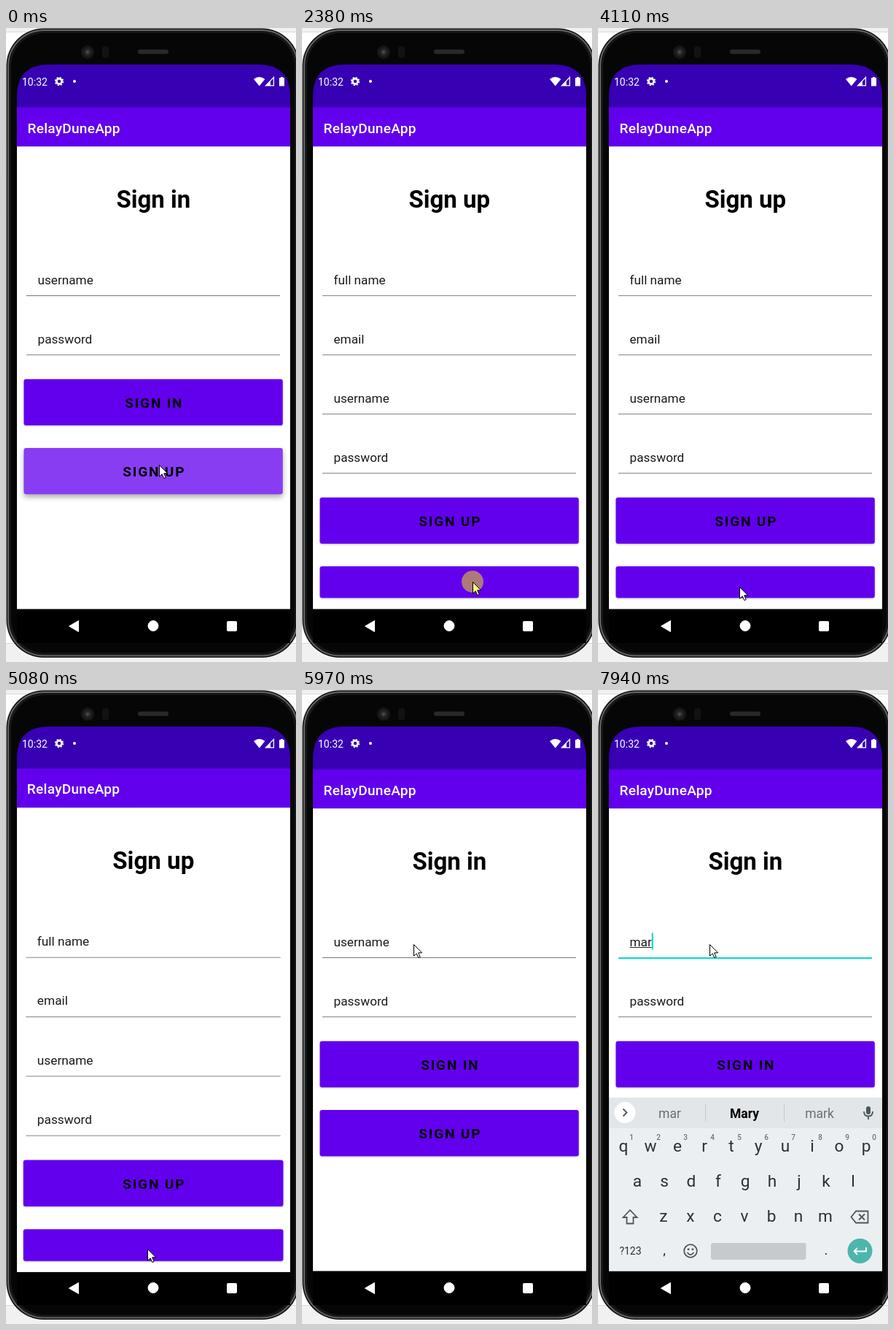
An HTML page for the animation above (8000 ms loop, 398 by 868 pixels).

```html
<!DOCTYPE html>
<html lang="en">
<head>
<meta charset="utf-8">
<title>Sign in and sign up</title>
<style>
  html, body { margin: 0; width: 100%; height: 100%; overflow: hidden; background: #fff; }
  svg { display: block; }
  text { font-family: Roboto, sans-serif; }
  .title { font-size: 19.1px; font-weight: 500; letter-spacing: .24px; fill: #fff; }
  .heading { font-size: 33px; font-weight: 700; text-anchor: middle; }
  .field { font-size: 17.2px; fill: #1a1a1a; }
  .label { font-size: 19.1px; font-weight: 700; letter-spacing: 1.8px; text-anchor: middle; }
  .button { filter: drop-shadow(0 1.5px 1px rgba(0,0,0,.28)); }
  .button.raised { filter: drop-shadow(0 4px 3.5px rgba(0,0,0,.32)); }
  #keyboard text { text-anchor: middle; fill: #263238; }
  #keyboard .key { font-size: 22.7px; }
  #keyboard .digit { font-size: 10px; font-weight: 500; fill: #6b7579; }
  #keyboard .word { font-size: 17.5px; fill: #657076; }
  .icon { fill: none; stroke: #4c575c; stroke-width: 1.8; }
</style>
</head>
<body>
<svg width="100%" height="100%" viewBox="0 0 398 868">
  <defs><clipPath id="screen"><path d="M15 842V94Q15 50 59 50H346Q390 50 390 94V842Z"/></clipPath></defs>

  <rect width="398" height="868" fill="#fff"/>
  <path d="M0 0H398V5H0ZM0 843H398V868H0Z" fill="#f1f1f1"/>
  <path d="M0 5.5H398M0 842.5H398" stroke="#dadada"/>

  <g id="phone">
    <rect x=".5" y=".5" width="402" height="861.5" rx="51" fill="#101010"/>
    <rect x="3" y="3" width="397" height="856.5" rx="49" fill="#171717" stroke="#626464" stroke-width="2"/>
    <rect x="7" y="7" width="389" height="848.5" rx="46" fill="#060606"/>
    <circle cx="112" cy="33" r="9" fill="#181818"/>
    <circle cx="112" cy="33" r="5" fill="#292929"/>
    <circle cx="112" cy="33" r="2" fill="#4a4a4a"/>
    <rect x="132" y="25" width="9" height="16" rx="3" fill="#121212"/>
    <rect x="181" y="29.5" width="42" height="6" rx="3" fill="#292929"/>
  </g>

  <g clip-path="url(#screen)">
    <rect x="15" y="50" width="375" height="792"/>
    <g id="pages"><g id="signUp"></g><g id="signIn"></g></g>
    <g id="keyboard"></g>
  </g>

  <g id="statusIcons" fill="#fff">
    <text x="22" y="78.5" font-size="14">10:32</text>
    <g fill="none" stroke="#fff">
      <circle cx="73" cy="73" r="3.6" stroke-width="2.6"/>
      <circle cx="73" cy="73" r="5.3" stroke-width="1.7" stroke-dasharray="2.2 1.96"/>
    </g>
    <circle cx="94" cy="73" r="2"/>
    <path d="M347.7 79.5L340 70Q347.7 64 355.4 70Z"/>
    <path d="M367.4 67.5V78.9H356.5Z" fill="none" stroke="#fff" stroke-width="1.3"/>
    <path d="M363 72.5V79H357Z"/>
    <path d="M377 67H380V68.3H382V79.5H375V68.3H377Z"/>
  </g>
  <g id="navIcons" fill="#fff" stroke="#fff" stroke-linejoin="round">
    <path d="M86.5 819L99.5 811.5V826.5Z"/>
    <circle cx="202" cy="818.5" r="7"/>
    <rect x="303.5" y="812.5" width="13" height="13" rx="1"/>
  </g>

  <g id="pointer">
    <circle id="halo" r="15" fill="#ff0" fill-opacity=".48"/>
    <path id="arrow" d="M.5 .5V16.2L4.2 12.8L6.8 18.6L9.2 17.5L6.7 11.8H11.6Z" stroke="#000"/>
  </g>
</svg>

<script>
const LOOP = 8000;
const PURPLE = '#6200ee', TEAL = '#03dac5';
const CENTER = [202.5, 446];
const $ = id => document.getElementById(id);
const clamp = v => Math.min(1, Math.max(0, v));
const show = (el, on) => el.setAttribute('display', on ? 'inline' : 'none');

const BURSTS = [
  [200, 200, 1], [810, 1150, 6], [1410, 2110, 11], [2380, 3050, 11],
  [3780, 4110, 6], [4370, 4800, 7], [5010, 5430, 7], [5620, 5970, 6],
  [6370, 6640, 4], [7170, 7370, 4], [7870, 7940, 2]
];
// Pointer path: time, x, y.
const PATH = [
  [0, 210, 598], [1340, 210, 598], [1650, 193, 690], [1900, 222, 768],
  [2110, 234, 758], [2740, 234, 758], [2950, 237, 526], [3050, 238, 541],
  [3710, 238, 541], [4000, 187, 740], [4110, 194, 765], [5550, 194, 765],
  [5780, 126, 560], [5970, 153, 348]
];
const CLICKS = [2380, 4370, 6370];

function button(id, y, height, label = '') {
  return `<g class="button" id="${id}">
    <rect x="24.5" y="${y}" width="355.3" height="${height}" rx="3" fill="${PURPLE}"/>
    <svg x="24.5" y="${y}" width="355.3" height="${height}"><circle class="ripple" r="0" fill="#fff"/></svg>
    <text class="label" x="203.3" y="${y + 39.2}">${label}</text></g>`;
}

function page(heading, fields, buttons) {
  const rows = fields.map((name, i) => `
    <text class="field" x="43.5" y="${350.5 + 81 * i}">${name}</text>
    <rect class="line" x="28" y="${366 + 81 * i}" width="348" height="1" fill="#858585"/>`);
  return `<rect x="15" y="50" width="375" height="792"/>
    <rect x="15" y="50" width="375" height="59" fill="#3700b3"/>
    <rect x="15" y="108.7" width="375" height="54" fill="${PURPLE}"/>
    <rect x="15" y="162.2" width="375" height="633.3" fill="#fff"/>
    <text class="title" x="29.5" y="143.5">RelayDuneApp</text>
    <text class="heading" x="202.3" y="245.5">${heading}</text>
    ${rows.join('')}${buttons}`;
}

function keyRow(letters, x, y, digits = '') {
  return [...letters].map((c, i) => `<text class="key" x="${x + 37 * i}" y="${y}">${c}</text>` +
    (digits ? `<text class="digit" x="${x + 11 + 37 * i}" y="616">${digits[i]}</text>` : '')).join('');
}

$('signIn').innerHTML = page('Sign in', ['username', 'password'],
  button('enter', 480.8, 63.3, 'SIGN IN') + button('join', 575, 63.3, 'SIGN UP')) + `
  <rect id="underline" x="43.5" y="352" height="1" fill="#222"/>
  <rect id="caret" y="332.5" width="2" height="23" fill="${TEAL}"/>`;
$('signUp').innerHTML = page('Sign up', ['full name', 'email', 'username', 'password'],
  button('create', 642.7, 63.3, 'SIGN UP') + button('back', 737, 43.3));

$('keyboard').innerHTML = `
  <rect x="15" y="558" width="375" height="237.5" fill="#eceff1"/>
  <rect x="15" y="558" width="375" height="42" fill="#e2e6e9"/>
  <circle cx="37" cy="578.5" r="14.5" fill="#fff"/>
  <path id="chevron" class="icon" d="M34.5 573.5L39.5 578.5L34.5 583.5"/>
  <g id="suggestions">
    <path d="M147.5 567V591M255.5 567V591" stroke="#c3c9cc"/>
    <text class="word" id="guess" x="98.5" y="586"></text>
    <text class="word" x="201" y="586" style="font-weight:700;fill:#000">Mary</text>
    <text class="word" x="304" y="586">mark</text>
  </g>
  <rect x="368" y="570" width="6" height="11" rx="3" fill="#4c575c"/>
  <path class="icon" d="M365 577Q365 583.5 371 583.5T377 577M371 583.5V588"/>
  ${keyRow('qwertyuiop', 35, 632, '1234567890')}
  ${keyRow('asdfghjkl', 54, 680)}
  ${keyRow('zxcvbnm', 90, 728)}
  <path class="icon" d="M44 712L34.5 722H39.5V730.5H48.5V722H53.5Z"/>
  <path class="icon" d="M347.5 721.5L354 713.5H370.5V729.5H354ZM358 717.5L366 725.5M366 717.5L358 725.5"/>
  <text x="44.5" y="773" font-size="14">?123</text>
  <text x="91" y="773" font-size="19">,</text>
  <circle class="icon" cx="127" cy="768" r="8.8"/>
  <path class="icon" d="M122.5 770Q127 776.5 131.5 770"/>
  <path d="M122.8 764.5h2.6v2.6h-2.6zM128.6 764.5h2.6v2.6h-2.6z" fill="#4c575c"/>
  <rect x="155" y="757" width="130.5" height="23" rx="3" fill="#c7cacc"/>
  <text x="313" y="773" font-size="19">.</text>
  <circle cx="359.5" cy="768" r="17" fill="#4db6ac"/>
  <path class="icon" style="stroke:#fff" d="M368 763V768.5H352M356 764L351.5 768.5L356 773"/>`;

const userText = $('signIn').querySelector('.field');
const userLine = $('signIn').querySelector('.line');

function hold(t) {
  const burst = BURSTS.findLast(b => b[0] <= t);
  if (!burst) return 0;
  const [start, end, count] = burst;
  if (t >= end) return end;
  const step = (end - start) / (count - 1);
  return start + Math.floor((t - start) / step + 1e-6) * step;
}

// Fast-out, extra-slow-in curve made of two cubic Béziers.
function ease(x) {
  const bezier = ([a, b, c, d], u) =>
    a * (1 - u) ** 3 + 3 * b * u * (1 - u) ** 2 + 3 * c * u * u * (1 - u) + d * u ** 3;
  const [xs, ys] = x < 1 / 6
    ? [[0, .05, .1333, 1 / 6], [0, 0, .06, .4]]
    : [[1 / 6, .2083, .25, 1], [.4, .82, 1, 1]];
  let low = 0, high = 1;
  for (let i = 0; i < 20; i++) {
    const mid = (low + high) / 2;
    if (bezier(xs, mid) < x) low = mid; else high = mid;
  }
  return bezier(ys, high);
}

function pointerAt(t) {
  const i = PATH.findIndex(p => p[0] > t);
  if (i < 0) return PATH.at(-1).slice(1);
  const [t0, x0, y0] = PATH[i - 1], [t1, x1, y1] = PATH[i];
  const k = (t - t0) / (t1 - t0);
  return [x0 + (x1 - x0) * k, y0 + (y1 - y0) * k];
}

function setPage(el, scale, alpha) {
  const s = Math.round(scale * 2000) / 2000, [x, y] = CENTER;
  el.setAttribute('transform', `translate(${x} ${y}) scale(${s}) translate(${-x} ${-y})`);
  el.setAttribute('opacity', alpha);
}

function openPage(enter, exit, elapsed) {
  if ($('pages').lastElementChild !== enter) $('pages').append(enter);
  const p = ease(clamp(elapsed / 400));
  setPage(enter, .85 + .15 * p, clamp((elapsed - 50) / 50));
  setPage(exit, 1 + .05 * p, elapsed < 340 ? 1 : 0);
}

function setRipple(id, x, y, radius, alpha, raised) {
  const circle = $(id).querySelector('.ripple');
  circle.setAttribute('cx', x);
  circle.setAttribute('cy', y);
  circle.setAttribute('r', radius);
  circle.setAttribute('opacity', alpha);
  $(id).classList.toggle('raised', raised);
}

function draw(now) {
  const t = hold(now % LOOP);

  if (t < 3000) openPage($('signUp'), $('signIn'), t - 770);
  else openPage($('signIn'), $('signUp'), t - 5042);

  const [x, y] = pointerAt(t);
  const clicked = CLICKS.some(c => t >= c && t < c + 140);
  $('pointer').setAttribute('transform', `translate(${x} ${y})`);
  $('arrow').setAttribute('fill', clicked ? '#ffff80' : '#fff');
  show($('halo'), clicked);

  setRipple('join', 178, 31, 400, t < 200 ? .24 : 0, t < 1300);
  const press = t < 4000 ? t - 2380 : t - 4370;
  setRipple('back', x - 24.5, 21, 260 * clamp(press / 280),
    .24 * clamp((420 - press) / 140), press > 0 && press < 420);

  const focused = t >= 6500;
  const typed = t >= 7940 ? 'mar' : t >= 7870 ? 'ma' : '';
  userText.textContent = typed || 'username';
  userLine.setAttribute('fill', focused ? TEAL : '#777');
  userLine.setAttribute('height', focused ? 2 : 1);
  const width = typed ? userText.getComputedTextLength() : 0;
  $('underline').setAttribute('width', width);
  $('caret').setAttribute('x', 43.5 + width);
  show($('caret'), focused && (t < 7240 || typed));

  const rise = clamp((t - 7100) / 270);
  show($('keyboard'), rise > 0);
  $('keyboard').setAttribute('transform', `translate(0 ${284 * (1 - rise) ** 2})`);
  $('chevron').setAttribute('transform', typed ? '' : 'rotate(180 37 578.5)');
  $('guess').textContent = typed;
  show($('suggestions'), typed);
}

const begin = performance.now();
function tick() {
  draw(performance.now() - begin);
  requestAnimationFrame(tick);
}
tick();
</script>
</body>
</html>
```
